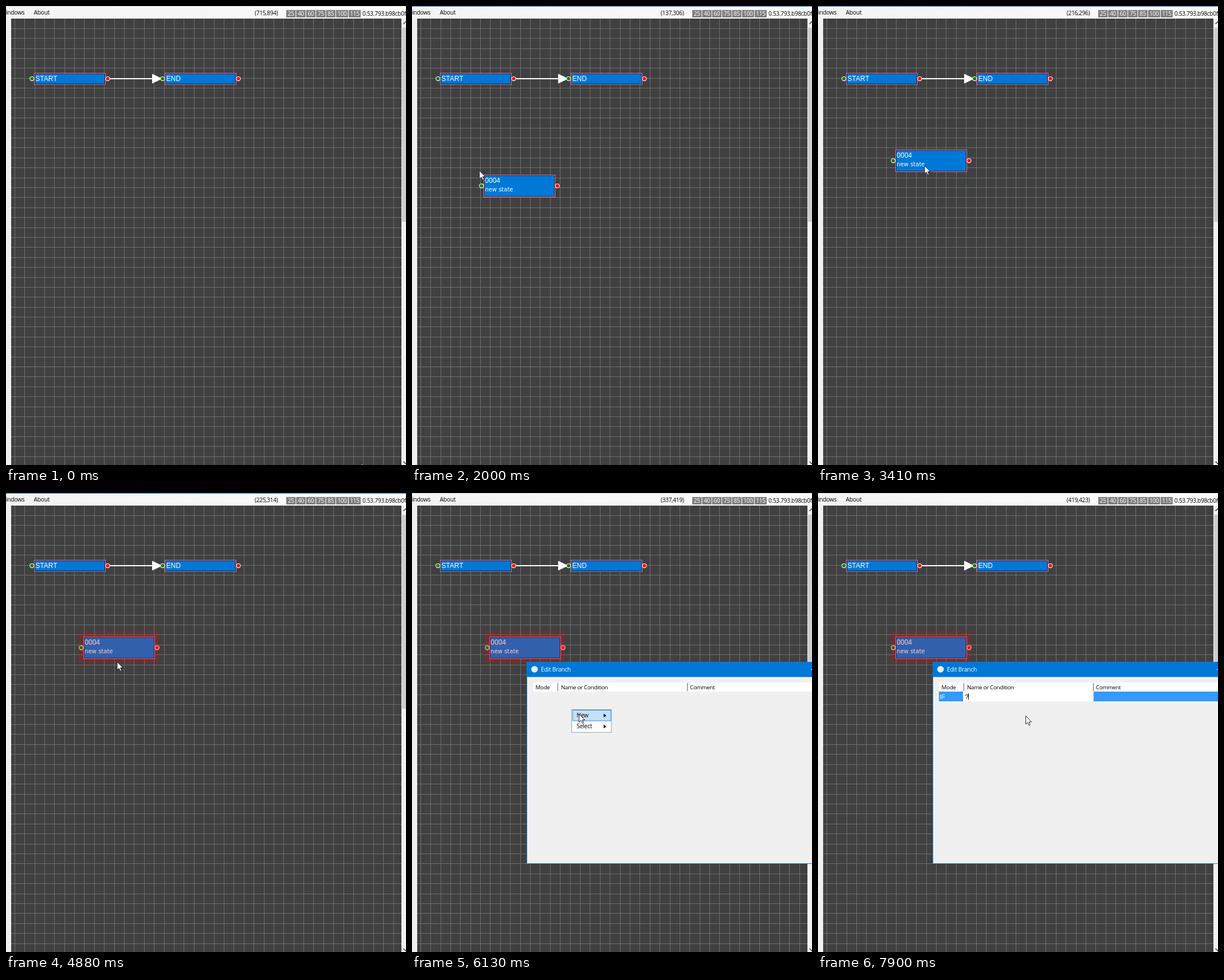
An HTML page that plays this animation: 698x802 px, repeating every 8000 ms.

```html
<!DOCTYPE html>
<html lang="en">
<head>
<meta charset="utf-8">
<title>State editor</title>
<style>
html, body { margin: 0; width: 100%; height: 100%; overflow: hidden; background: #f0f0f0; }
svg { display: block; }
text { font-family: "Open Sans", "Noto Sans", sans-serif; font-size: 10.2px; letter-spacing: -.2px; fill: #000; white-space: pre; }
.small { font-size: 10px; letter-spacing: -.25px; }
.head { font-size: 9.8px; letter-spacing: -.3px; }
.white { fill: #fff; }
.node { font-family: "Liberation Sans", Arial, sans-serif; font-size: 12px; letter-spacing: 0; fill: #fff; }
.note { font-family: "DejaVu Sans", sans-serif; font-size: 10px; letter-spacing: 0; fill: #fff; }
.cell { font-family: "Liberation Sans", Arial, sans-serif; font-size: 10.5px; letter-spacing: 0; }
</style>
</head>
<body>
<svg id="stage" width="698" height="802" viewBox="0 0 698 802"></svg>
<script>
const stage = document.getElementById('stage');
const LOOP = 8000, ZOOM = 1.15, STEP = 20 / ZOOM, ROW = 22 / ZOOM;

const rect = (x, y, w, h, fill, extra = '') =>
  `<rect x="${x}" y="${y}" width="${w}" height="${h}" fill="${fill}" ${extra}/>`;
const text = (x, y, s, cls = '', extra = '') =>
  `<text x="${x}" y="${y}" class="${cls}" ${extra}>${s}</text>`;
const group = (id, body) => `<g id="${id}">${body}</g>`;

function grid() {
  let d = '';
  for (let x = 14.75; x < 690; x += STEP) d += `M${Math.round(x) + .5} 22V802`;
  for (let y = 38.75; y < 802; y += STEP) d += `M9 ${Math.round(y) + .5}H690`;
  return rect(9, 22, 681, 780, '#404040') + `<path d="${d}" stroke="#6e6e6e" fill="none"/>`;
}

const port = (x, y, fill) =>
  `<circle cx="${x}" cy="${y}" r="3.6" fill="${fill}" stroke="#fff" stroke-width="1.1"/>`;

function box(x, y, h, labels) {
  const mid = y + h / 2 + .3;
  return rect(x + .5, y + .5, 124, h, '#0078d7', 'stroke="#e878a8"') +
    rect(x + 1.5, y + 1.5, 122, h - 2, 'none', 'stroke="#10233c"') +
    labels + port(x - 3.7, mid, '#008000') + port(x + 128.5, mid, '#f00');
}

const stateBox = () => box(0, 0, 38, text(2.3, 14, '0004', 'node') + text(2.3, 29, 'new state', 'note'));
const tint = rect(-8, -8.5, 140, 54.5, '#f00', 'opacity=".2"');

function zoomButtons() {
  let x = 489;
  return [25, 40, 60, 75, 85, 100, 115].map(n => {
    const w = n < 100 ? 17.4 : 22;
    const part = rect(x, 7, w - 1.1, 13, '#808080') +
      text(x + w / 2 - .5, 17, n, 'small white', 'text-anchor="middle"');
    x += w;
    return part;
  }).join('');
}

function toolbar() {
  return rect(0, 0, 698, 22, 'url(#bar)') + rect(0, 0, 698, 1, '#dcdcdc') +
    rect(0, 0, 698, 1, '#0078d7', 'id="active"') +
    text(32.5, 15, 'Windows', '', 'text-anchor="end"') + text(48.5, 15, 'About') +
    text(434, 16, '', 'small', 'id="coords"') + zoomButtons() +
    text(622, 17, '0.53.793.b98cb0f', 'small');
}

function scrollbar() {
  return rect(690, 22, 8, 780, '#f0f0f0') + rect(691, 38, 7, 339, '#cdcdcd') +
    '<path d="M693.5 31.5L698 27M693.5 796L698 800.5" stroke="#505050" stroke-width="1.6" fill="none"/>';
}

// A gap, if given, sits before the last item.
function menu(id, x, y, w, items, gap = 0, arrows = false) {
  const h = items.length * ROW + 2.5 + gap;
  const rowY = i => y + 1 + ROW * i + (i === items.length - 1 ? gap : 0);
  return group(id,
    rect(x + .5, y + .5, w - 1, h - 1, '#fdfdfd', 'stroke="#a0a0a0"') +
    rect(x + 2.5, 0, w - 4, 18.5, '#c4e0fb', `class="hot" data-x="${x}" data-y="${y + 1}" stroke="#2f8fe5"`) +
    (gap ? rect(x + 3, rowY(items.length - 1) - 5, w - 6, 1, '#d7d7d7') : '') +
    items.map((s, i) => text(x + 9.3, rowY(i) + 13.2, s) +
      (arrows ? `<path d="M${x + 56.5} ${rowY(i) + 6.6}l4.6 3.3l-4.6 3.3z"/>` : '')).join(''));
}

function dialog() {
  const columns = [[211, 'Mode', 215.5], [254, 'Name or Condition', 260], [480, 'Comment', 485]];
  return group('dialog',
    rect(200, 295, 498, 353, '#f0f0f0') +
    '<path d="M200.5 295V647.5H698" stroke="#1a7fcb" fill="none"/>' +
    rect(200, 295, 498, 26.5, '#0078d7') + rect(696, 308, 2, 1, '#fff') +
    '<circle cx="213.8" cy="308" r="5.8" fill="#e4eef6"/>' +
    text(225, 312, 'Edit Branch', 'white') +
    rect(211, 331, 487, 16, '#fff') +
    columns.map(([x, s, tx], i) => (i ? rect(x, 332, 1, 14, '#606060') : '') + text(tx, 342.5, s, 'head')).join('') +
    group('row',
      rect(211, 347, 487, 17, '#3399ff') + rect(254, 347, 226, 17, '#fff', 'id="cell"') +
      rect(253, 347, 1, 17, '#f0f0f0') + rect(480, 347, 1, 17, '#f0f0f0') +
      text(212.5, 359.5, 'IF', 'cell white') + text(256.5, 359.5, '?', 'cell', 'id="mark"') +
      rect(262, 350, 1, 11, '#000', 'id="caret"')));
}

stage.innerHTML =
  '<defs><linearGradient id="bar"><stop offset="0" stop-color="#f3f3f4"/><stop offset="1" stop-color="#fcfcfd"/></linearGradient></defs>' +
  rect(0, 0, 698, 802, '#f0f0f0') + grid() + toolbar() + scrollbar() +
  '<path d="M181 127H256" stroke="#fff" stroke-width="2"/><path d="M255 118.5L273 127L255 135.5z" fill="#fff"/>' +
  box(49, 117, 19.5, text(51.3, 131, 'START', 'node')) +
  box(277, 117, 19.5, text(279.6, 131, 'END', 'node')) +
  rect(258, 296, 1, 17, '#2f7a2f', 'id="trace"') +
  group('ghost', stateBox() + tint) +
  group('state', rect(-8, -7, 139.5, 53, '#f00', 'id="frame"') + stateBox() + group('halo', tint)) +
  menu('canvasMenu', 83, 262, 137.5, ['Leave', 'New state', 'Paste from clipboard', 'History back', 'History forward']) +
  menu('stateMenu', 179, 280, 114, ['Edit branch', 'Edit state', 'Copy', 'Cut', 'Delete'], 9) +
  dialog() +
  menu('branchMenu', 278, 378, 70.5, ['New', 'Select'], 0, true) +
  menu('modeMenu', 347, 380.5, 80, ['IF', 'ELSE IF', 'ELSE', 'API']) +
  '<circle id="press" r="10.5" fill="#ff0" opacity=".48"/>' +
  '<path id="pointer" d="M0 0V14.3L3.2 11.3L5.6 16.4L7.8 15.4L5.5 10.5H10z" fill="#fff" stroke="#111" stroke-width=".9"/>';

const el = {};
stage.querySelectorAll('[id]').forEach(e => el[e.id] = e);

// Pointer moves: start time, end time, x, y; it rests in between.
const moves = [
  [0, 0, 620, 799], [50, 540, 98, 271], [790, 920, 83, 262], [1090, 1340, 116.5, 280.2],
  [1400, 1510, 115.7, 286.5], [1960, 2310, 167.7, 316], [2420, 2610, 174.7, 288],
  [2640, 2850, 177.7, 272], [3100, 3400, 186, 279], [3500, 3630, 179, 280], [4290, 4570, 194, 295],
  [5030, 5430, 278, 378], [5600, 5900, 291.5, 386], [6260, 6800, 359, 390], [7280, 7610, 362.5, 389.5]
];
const GRAB = 2420, DROP = 3080;
const presses = [[950, 1080], [1680, 1830], [GRAB - 20, DROP], [3960, 4330], [4710, 4790], [5430, 5510], [6880, 7000]];

function pointerAt(t) {
  let x = 0, y = 0;
  for (const [a, b, toX, toY] of moves) {
    if (t < a) break;
    const u = b > a ? Math.min(1, (t - a) / (b - a)) : 1;
    const k = u * u * (3 - 2 * u);
    x += (toX - x) * k;
    y += (toY - y) * k;
  }
  return [x, y];
}

const show = (e, on) => { e.style.display = on ? '' : 'none'; };
const move = (e, x, y) => e.setAttribute('transform', `translate(${x.toFixed(2)} ${y.toFixed(2)})`);

// Highlights the row level with the pointer.
function setMenu(id, on, x, y) {
  const bar = el[id].querySelector('.hot');
  const top = +bar.dataset.y, row = Math.floor((y - top) / ROW);
  show(el[id], on);
  show(bar, row >= 0 && x > +bar.dataset.x);
  bar.setAttribute('y', top + .5 + ROW * row);
}

function render(t) {
  const within = (a, b) => t >= a && t < b;
  const [x, y] = pointerAt(t);
  move(el.pointer, x, y);
  move(el.press, x, y);
  show(el.press, presses.some(([a, b]) => within(a, b)));
  el.coords.textContent = `(${Math.floor(ZOOM * x + 2.2)},${Math.floor(ZOOM * y - 24.7)})`;
  show(el.active, within(980, 4960));

  const drag = within(GRAB, DROP);
  const [nx, ny] = t < GRAB ? [125, 295] : drag ? [x - 42.7, y - 21] : [135, 251];
  move(el.state, Math.round(nx), Math.round(ny));
  move(el.ghost, 125, 295);
  show(el.state, t >= 1910);
  show(el.frame, drag);
  show(el.ghost, drag);
  show(el.halo, within(2200, GRAB) || t >= 3560);
  show(el.trace, within(DROP, 3960));

  setMenu('canvasMenu', within(1050, 1830), x, y);
  setMenu('stateMenu', within(3960, 4790), x, y);
  setMenu('branchMenu', within(5550, 7000), x, y);
  setMenu('modeMenu', within(6300, 7000), x, y);

  const editing = t >= 7310;
  show(el.dialog, t >= 4960);
  show(el.row, t >= 7060);
  show(el.cell, editing);
  el.mark.style.fill = editing ? '#000' : '#fff';
  show(el.caret, within(7310, 7450) || t >= 7900);
}

const start = performance.now();
function tick() {
  render((performance.now() - start) % LOOP);
  requestAnimationFrame(tick);
}
tick();
</script>
</body>
</html>
```
